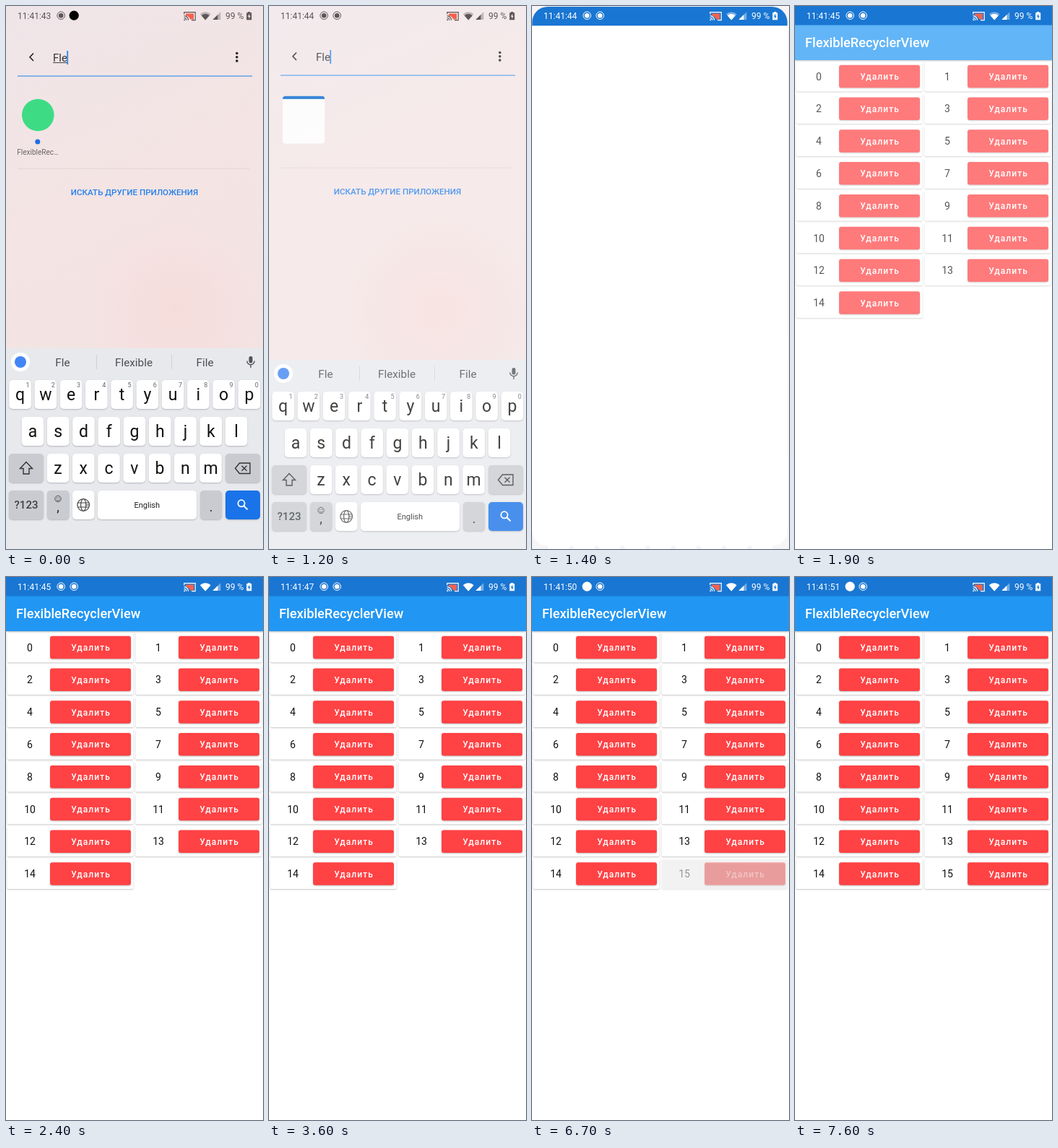
These frames come from a looping animation (356x752 px, 8000 ms). An HTML page with a canvas:

```html
<!DOCTYPE html>
<html lang="ru">
<head>
<meta charset="utf-8">
<title>FlexibleRecyclerView</title>
<style>
html, body { margin: 0; width: 100%; height: 100%; overflow: hidden; background: #fff; }
canvas { display: block; }
</style>
</head>
<body>
<canvas id="stage" width="356" height="752"></canvas>
<script>
const W = 356, H = 752, LOOP = 8000;
const ctx = document.getElementById('stage').getContext('2d');
const clamp = v => Math.min(1, Math.max(0, v));
const mix = (a, b, p) => a + (b - a) * p;

function rect(x, y, w, h, color) {
  ctx.fillStyle = color;
  ctx.fillRect(x, y, w, h);
}

function roundRect(x, y, w, h, r, color, shadow) {
  ctx.save();
  if (shadow) {
    ctx.shadowColor = shadow;
    ctx.shadowBlur = 2;
    ctx.shadowOffsetY = 1;
  }
  ctx.fillStyle = color;
  ctx.beginPath();
  ctx.roundRect(x, y, w, h, r);
  ctx.fill();
  ctx.restore();
}

function disc(x, y, r, color) {
  ctx.fillStyle = color;
  ctx.beginPath();
  ctx.arc(x, y, r, 0, Math.PI * 2);
  ctx.fill();
}

function stroke(path, color, width) {
  ctx.strokeStyle = color;
  ctx.lineWidth = width;
  ctx.stroke(new Path2D(path));
}

function fill(path, color) {
  ctx.fillStyle = color;
  ctx.fill(new Path2D(path));
}

function text(str, x, y, size, color, { align = 'center', weight = 400, spacing = 0 } = {}) {
  ctx.font = `${weight} ${size}px Roboto, sans-serif`;
  ctx.textAlign = align;
  ctx.letterSpacing = spacing + 'px';
  ctx.fillStyle = color;
  ctx.fillText(str, x, y);
}

function recordDot(x, solid, color) {
  if (solid) return disc(x, 13.2, 6.6, color);
  disc(x, 13.2, 3.3, color);
  ctx.strokeStyle = color;
  ctx.lineWidth = 1;
  ctx.beginPath();
  ctx.arc(x, 13.2, 5.3, 0, Math.PI * 2);
  ctx.stroke();
}

function statusIcons(t, light) {
  const ink = light ? '#fff' : '#5c5658';
  const faint = light ? 'rgba(255,255,255,.4)' : 'rgba(92,86,88,.35)';
  const seconds = 43 + Math.floor((t + 300) / 970);
  text('11:41:' + seconds, 16, 17.8, 12, ink, { align: 'left' });
  recordDot(76.2, t >= 5550, ink);
  recordDot(94.2, t < 500, light ? ink : t < 500 ? '#000' : ink);

  // screen cast
  fill('M249 10.5h11v8h-5a7 7 0 0 0-6-5z', '#f4634e');
  stroke('M246.8 11.5V8.6h15.4v11h-5.2', ink, 1.2);
  stroke('M246.6 13.7a6 6 0 0 1 6 6M246.6 16.4a3.3 3.3 0 0 1 3.3 3.3', ink, 1.2);
  disc(247.2, 19.2, 1, ink);

  // wifi, signal, battery
  fill('M268.8 11.2a11 11 0 0 1 14.8 0L276.2 19.6z', light && t > 2000 ? ink : faint);
  fill('M270.7 13.2a8.3 8.3 0 0 1 11 0L276.2 19.6z', ink);
  fill('M297.3 8.2V19H286.3z', faint);
  fill('M293.4 12V19H286.3z', ink);
  text('99 %', 304, 17.8, 12, ink, { align: 'left' });
  fill('M335.2 8h3v1.2h2V19.3h-7V9.2h2z', ink);
  fill('M337.4 10.4l-2.6 4.4h1.6v3.2l2.4-4.3h-1.5z', light ? '#1976d2' : '#f2e6e7');
}

function wallpaper() {
  let g = ctx.createLinearGradient(0, 0, W, H);
  g.addColorStop(0, '#efe5e8');
  g.addColorStop(0.35, '#f4e4e4');
  g.addColorStop(1, '#f1e2e2');
  rect(0, 0, W, H, g);
  g = ctx.createRadialGradient(235, 420, 5, 235, 420, 130);
  g.addColorStop(0, 'rgba(247,218,215,.7)');
  g.addColorStop(1, 'rgba(247,218,215,0)');
  rect(0, 250, W, 330, g);
}

function launcher(leaving) {
  ctx.save();
  if (leaving) ctx.translate(0, -1);
  stroke('M38 65.5L33 70.8L38 76', '#222', 1.6);
  text('Fle', 65, 76.5, 15, '#333', { align: 'left' });
  if (!leaving) rect(65, 78, 20, 1, '#444');
  rect(84.3, 62, 1.8, 19, '#2f86e8');
  for (const y of [65.5, 70.8, 76.1]) disc(319.8, y, 1.8, '#222');
  rect(16, 96.4, 325, 1.3, '#4a9bec');
  if (!leaving) {
    disc(44.3, 151, 22.3, '#3ddc84');
    disc(43.8, 188, 3.5, '#1f6fe5');
    text('FlexibleRec…', 44, 206, 10, '#6b6466');
  }
  rect(16, 224.6, 321, 1, '#e2d5d6');
  text('ИСКАТЬ ДРУГИЕ ПРИЛОЖЕНИЯ', 178, 262.2, 11.6, '#2680eb', { weight: 500 });
  ctx.restore();
}

const GREY_KEY = '#c9cbd0', KEY_SHADOW = 'rgba(60,64,70,.3)';

function key(x, y, w, color = '#fff') {
  roundRect(x, y, w, 40, 5, color, KEY_SHADOW);
}

function letterRow(letters, firstX, y, digits) {
  [...letters].forEach((ch, i) => {
    const x = firstX + i * 35.25;
    key(x - 15.3, y, 30.6);
    text(ch, x, y + 27.5, 23, '#111');
    if (digits) text(String((i + 1) % 10), x + 10.5, y + 10, 9, '#62666b');
  });
}

function keyboard(offset) {
  ctx.save();
  ctx.translate(0, offset);
  rect(0, 474, W, 290, '#e8e9ed');

  // suggestion strip
  disc(20, 493, 13, '#fff');
  disc(20, 493, 8, '#4285f4');
  text('Fle', 78.5, 499, 15.3, '#4a4d52');
  text('Flexible', 177, 499, 15.3, '#4a4d52');
  text('File', 275.5, 499, 15.3, '#4a4d52');
  rect(125, 483, 1, 20, '#cfd1d5');
  rect(229, 483, 1, 20, '#cfd1d5');
  roundRect(336.5, 485, 5, 9.5, 2.5, '#50545a');
  stroke('M333.8 491.5a5.2 5.2 0 0 0 10.4 0M339 497v4', '#50545a', 1.4);

  letterRow('qwertyuiop', 19.6, 518, true);
  letterRow('asdfghjkl', 37, 569);
  letterRow('zxcvbnm', 72, 620);

  key(4, 620, 48, GREY_KEY);
  stroke('M28 631.5l-8.5 9h4.5v7.5h8v-7.5h4.5z', '#333', 1.4);
  key(304, 620, 48, GREY_KEY);
  stroke('M323.5 633h14.5v14.5h-14.5l-6-7.2z', '#333', 1.4);
  stroke('M326.5 636.8l7 7M333.5 636.8l-7 7', '#333', 1.4);

  key(4, 671, 48, GREY_KEY);
  text('?123', 28, 696.3, 15, '#3c4043', { weight: 500 });
  key(57, 671, 30.5, GREY_KEY);
  text(',', 72, 700, 18, '#222');
  ctx.strokeStyle = '#444';
  ctx.lineWidth = 0.9;
  ctx.beginPath();
  ctx.arc(72, 682.5, 4.2, 0, Math.PI * 2);
  ctx.stroke();
  stroke('M69.6 683.5a2.6 2.6 0 0 0 4.8 0', '#444', 0.9);
  disc(70.5, 681.3, 0.7, '#444');
  disc(73.5, 681.3, 0.7, '#444');

  key(92, 671, 30.5);
  ctx.strokeStyle = '#444';
  ctx.lineWidth = 1.2;
  ctx.beginPath();
  ctx.arc(107.2, 691, 8.3, 0, Math.PI * 2);
  ctx.ellipse(107.2, 691, 3.6, 8.3, 0, 0, Math.PI * 2);
  ctx.stroke();
  stroke('M99.7 688h15M99.7 694h15', '#444', 1.2);

  key(127, 671, 137);
  text('English', 195.3, 695, 11, '#222');
  key(269, 671, 30, GREY_KEY);
  text('.', 284, 700, 18, '#222');
  key(304, 671, 48, '#1a73e8');
  ctx.strokeStyle = '#fff';
  ctx.lineWidth = 1.8;
  ctx.beginPath();
  ctx.arc(326, 688.8, 4.6, 0, Math.PI * 2);
  ctx.stroke();
  stroke('M329.4 692.2l5.2 5.2', '#fff', 2);
  ctx.restore();
}

// The starting window grows out of the tapped icon.
function startingWindow(t) {
  const p = 1 - (1 - clamp((t - 1200) / 250)) ** 3;
  const x = mix(19, 0, p), y = mix(126, 0, p);
  const w = mix(55, W, p), h = mix(58, H, p);
  ctx.save();
  ctx.globalAlpha = mix(0.86, 1, clamp(p * 1.5));
  ctx.beginPath();
  ctx.roundRect(x, y, w, h, t < 1500 ? mix(4, 22, p) : 0);
  ctx.clip();
  rect(x, y, w, h, '#fff');
  rect(x, y, w, 26.5 * w / W, '#1976d2');
  ctx.restore();
}

function card(index, alpha) {
  const x = (index % 2) * 178, y = Math.floor(index / 2) * 44.8;
  ctx.save();
  ctx.globalAlpha = alpha;
  roundRect(x + 1.5, y + 76.3, 175, 42, 2, '#fff', 'rgba(0,0,0,.22)');
  text(String(index), x + 33, y + 102.6, 14, '#111');
  roundRect(x + 61, y + 81.7, 112, 31.5, 3, '#ff4244', 'rgba(0,0,0,.25)');
  text('Удалить', x + 117.5, y + 102, 12, '#fff', { weight: 500, spacing: 1.05 });
  ctx.restore();
}

function listScreen(t) {
  rect(0, 0, W, H, '#fff');
  const shown = clamp((t - 1760) / 200);
  if (shown > 0) {
    for (let i = 0; i < 15; i++) card(i, 1);
    const added = clamp((t - 6640) / 150);
    if (added > 0) card(15, added);
    roundRect(0, 26, W, 49, 0, '#2196f3', 'rgba(0,0,0,.3)');
    rect(0, 26, W, H, `rgba(255,255,255,${1 - shown})`);
    text('FlexibleRecyclerView', 14, 57.3, 18.2, '#fff', { align: 'left', weight: 500 });
  }
  rect(0, 0, W, 26.5, '#1976d2');
}

function draw(t) {
  ctx.clearRect(0, 0, W, H);
  if (t < 1500) {
    wallpaper();
    launcher(t >= 1150);
    keyboard(Math.round(16 * Math.max(0, (t - 1100) / 100) ** 2));
    rect(0, 0, W, H, `rgba(255,255,255,${clamp((t - 1100) / 500)})`);
    if (t >= 1200) startingWindow(t);
  } else {
    listScreen(t);
  }
  statusIcons(t, t >= 1350);
}

function tick(now) {
  draw(now % LOOP);
  requestAnimationFrame(tick);
}
draw(0);
requestAnimationFrame(tick);
</script>
</body>
</html>
```
